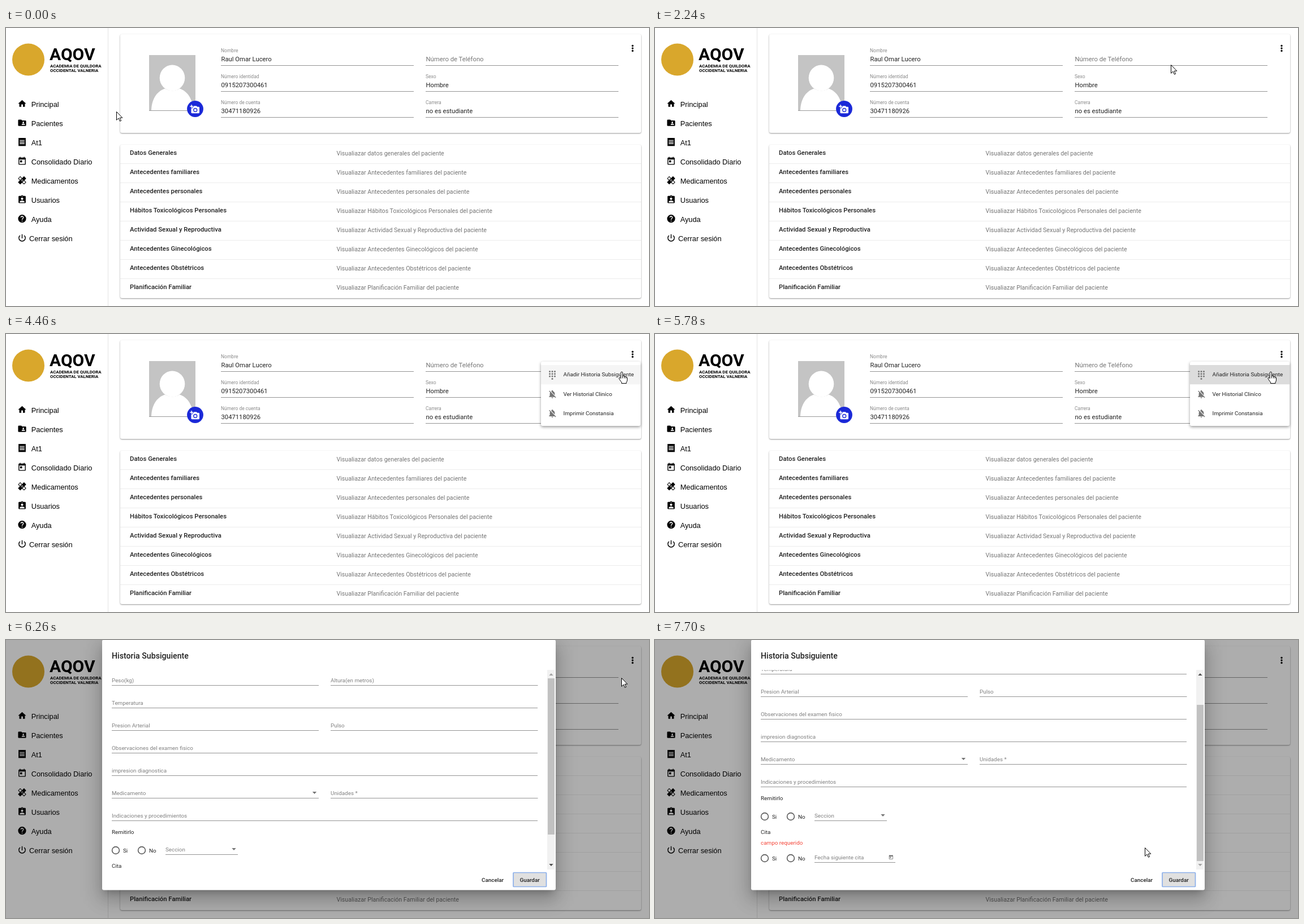
Animation, 1137 px wide and 493 px high, one loop 8000 ms. Source, as an HTML page:

```html
<!DOCTYPE html>
<html lang="es">
<head>
<meta charset="utf-8">
<style>
html, body { margin: 0; width: 100%; height: 100%; overflow: hidden; background: #fff; }
svg { display: block; width: 1137px; height: 493px; font-family: Roboto, sans-serif; }
.side { font: 12.75px "Liberation Sans", Arial, sans-serif; }
.brand { font-weight: 700; }
.tag { font-size: 8.5px; fill: #8a8a8a; }
.val { font-size: 11.25px; fill: #212121; }
.hint { font-size: 11.3px; fill: #757575; }
.dim { font-size: 10.65px; fill: #757575; }
.head { font-size: 11.3px; font-weight: 500; fill: #212121; }
.item { font-size: 9.9px; fill: #212121; }
.form { font-size: 9.85px; fill: #808080; }
.ink { font-size: 9.85px; fill: #212121; }
.err { font-size: 9.85px; fill: #f44336; }
.btn { font-size: 9.85px; font-weight: 500; fill: #212121; }
.title { font-size: 14.15px; font-weight: 500; fill: #212121; }
.card { fill: #fff; filter: drop-shadow(0 1px 1px rgba(0,0,0,.42)); }
.panel { fill: #fff; filter: drop-shadow(0 2px 2.5px rgba(0,0,0,.4)); }
</style>
</head>
<body>
<svg id="stage" viewBox="0 0 1137 493">
  <defs>
    <clipPath id="rowClip"><rect x="946" y="55" width="176" height="34.3"/></clipPath>
    <clipPath id="formClip"><rect x="170" y="53" width="802" height="354"/></clipPath>
  </defs>
  <g id="page"></g>
  <circle id="halo" cx="1108" cy="36" r="14" fill="#000"/>
  <g id="dots"></g>
  <g id="menu"></g>
  <rect id="shade" width="1137" height="493"/>
  <g id="dialog"></g>
  <g id="pointer" fill="#fff" stroke="#000" stroke-linejoin="round">
    <path id="arrow" d="M.5.5v14.8l3.5-3.3 2.4 5.3 2.2-1-2.4-5.1h4.6z"/>
    <path id="hand" d="M-.8 1.8a1.6 1.6 0 0 1 3.2 0V8l1-.6q1.8-.5 2.2 1 2-.8 2.6.8 2.2-.4 2.3 1.6v4q0 2-1.5 4v1.8H.6v-1.9q-1.6-1.6-4.4-6.4-.6-1.6.8-2.1 1.3-.2 2.2 1.6zM2.4 8v3.5M5.6 8.5v3M8.2 9.2v2.5"/>
  </g>
</svg>
<script>
const $ = id => document.getElementById(id);
const text = (cls, x, y, s) => `<text class="${cls}" x="${x}" y="${y}">${s}</text>`;
const rect = (x, y, w, h, attrs = '') => `<rect x="${x}" y="${y}" width="${w}" height="${h}" ${attrs}/>`;
const circle = (x, y, r, attrs = '') => `<circle cx="${x}" cy="${y}" r="${r}" ${attrs}/>`;
const rule = (x1, x2, y, color = '#949494') => rect(x1, y - .5, x2 - x1, 1, `fill="${color}"`);
const icon = (name, cx, cy, size, color = '#000') =>
  `<path transform="translate(${cx - size / 2} ${cy - size / 2}) scale(${size / 24})" fill="${color}" fill-rule="evenodd" d="${icons[name]}"/>`;
const arrow = (x, y, dir, color, id = '') =>
  `<path ${id && `id="${id}"`} fill="${color}" d="M${x - 3.7} ${y - 1.9 * dir}h7.4l-3.7 ${3.8 * dir}z"/>`;
const shadow = (x, y, w, h, drop, blur, spread, alpha) =>
  rect(x - spread, y - spread + drop, w + 2 * spread, h + 2 * spread,
    `rx="3" fill-opacity="${alpha}" style="filter:blur(${blur / 2}px)"`);

const icons = {
  home: 'M10 20v-6h4v6h5v-8h3L12 3 2 12h3v8z',
  folder: 'M20 6h-8l-2-2H4q-2 0-2 2v12q0 2 2 2h16q2 0 2-2V8q0-2-2-2zm-5 3a2 2 0 1 1 0 4 2 2 0 0 1 0-4zm4 8h-8v-1c0-1.3 2.7-2 4-2s4 .7 4 2z',
  list: 'M3 2h18v20H3zM6 7v2h12V7zM6 11v2h12v-2zM6 15v2h12v-2z',
  date: 'M19 3h-1V1h-2v2H8V1H6v2H5q-2 0-2 2v14q0 2 2 2h14q2 0 2-2V5q0-2-2-2zm0 16H5V8h14zM7 10h5v5H7z',
  heal: 'M17.7 12l4-4q.7-.7 0-1.4l-4.3-4.3q-.7-.7-1.4 0l-4 4-4-4q-.7-.7-1.4 0L2.3 6.6q-.7.7 0 1.4l4 4-4 4q-.7.7 0 1.4l4.3 4.3q.7.7 1.4 0l4-4 4 4q.7.7 1.4 0l4.3-4.3q.7-.7 0-1.4zM12 9a1 1 0 1 1 0 2 1 1 0 0 1 0-2zm-4.7 2L3.7 7.3l3.6-3.6 3.6 3.6zM10 13a1 1 0 1 1 0-2 1 1 0 0 1 0 2zm2 2a1 1 0 1 1 0-2 1 1 0 0 1 0 2zm2-4a1 1 0 1 1 0 2 1 1 0 0 1 0-2zm2.7 9.3l-3.6-3.6 3.6-3.6 3.6 3.6z',
  badge: 'M19 3h-4.2a3 3 0 0 0-5.6 0H5q-2 0-2 2v14q0 2 2 2h14q2 0 2-2V5q0-2-2-2zm-7 0a1 1 0 1 1 0 2 1 1 0 0 1 0-2zm0 4a3 3 0 1 1 0 6 3 3 0 0 1 0-6zm6 12H6v-1.4c0-2 4-3.1 6-3.1s6 1.1 6 3.1z',
  help: 'M12 2a10 10 0 1 0 0 20 10 10 0 0 0 0-20zm1 17h-2v-2h2zm2.1-7.8l-.9 1C13.4 12.9 13 13.5 13 15h-2v-.5c0-1.1.4-2.1 1.2-2.8l1.2-1.3A2 2 0 1 0 10 9H8a4 4 0 1 1 7.1 2.2z',
  power: 'M13 3h-2v10h2zM17.8 5.2l-1.4 1.4a7 7 0 1 1-8.8 0L6.2 5.2a9 9 0 1 0 11.6 0z',
  photo: 'M3 4V1h2v3h3v2H5v3H3V6H0V4zM6 10V7h3V4h7l1.8 2H21q2 0 2 2v12q0 2-2 2H5q-2 0-2-2V10zm7 9a5 5 0 1 0 0-10 5 5 0 0 0 0 10zm0-1.8a3.2 3.2 0 1 1 0-6.4 3.2 3.2 0 0 1 0 6.4z',
  muted: 'M20 18.7L5.3 3.5 4 4.8l2.8 2.8Q6 9 6 11v5l-2 2v1h13.7l2 2 1.3-1.3zM12 22q2 0 2-2h-4q0 2 2 2zm6-7.3V11c0-3.1-1.6-5.6-4.5-6.3V4a1.5 1.5 0 0 0-3 0v.7l-1.4.5z'
};

function drawPage() {
  const nav = [['home', 'Principal'], ['folder', 'Pacientes'], ['list', 'At1'], ['date', 'Consolidado Diario'],
    ['heal', 'Medicamentos'], ['badge', 'Usuarios'], ['help', 'Ayuda'], ['power', 'Cerrar sesión']];
  const fields = [[380, 0, 'Nombre', 'Raul Omar Lucero'], [742, 0, '', 'Número de Teléfono'],
    [380, 1, 'Número identidad', '0915207300461'], [742, 1, 'Sexo', 'Hombre'],
    [380, 2, 'Número de cuenta', '30471180926'], [742, 2, 'Carrera', 'no es estudiante']];
  const sections = ['Datos Generales', 'Antecedentes familiares', 'Antecedentes personales',
    'Hábitos Toxicológicos Personales', 'Actividad Sexual y Reproductiva', 'Antecedentes Ginecológicos',
    'Antecedentes Obstétricos', 'Planificación Familiar'];

  let s = rect(0, 0, 1137, 493, 'fill="#fff"') + rect(180, 0, 1, 493, 'fill="#e3e3e3"')
    + circle(39.5, 56, 28.5, 'fill="#d9a72c"')
    + '<g class="brand">'
    + '<text x="77" y="56.5" font-size="30">AQOV</text>'
    + '<text x="78" y="70" font-size="7.8">ACADEMIA DE QUILDORA</text>'
    + '<text x="78" y="78.3" font-size="7.8">OCCIDENTAL VALNERIA</text></g>';
  nav.forEach(([name, label], i) => {
    const y = 135 + 34 * i;
    s += icon(name, 28.5, y - .8, 17) + text('side', name === 'power' ? 41 : 44.7, y + 5, label);
  });

  s += rect(202, 11, 921, 175, 'rx="3" class="card"') + rect(202, 207, 921, 272, 'rx="3" class="card"');
  s += rect(253, 48, 82, 99, 'fill="#c4c4c4"')
    + '<path fill="#fff" d="M257 146C258 122 270 111 281 107.5Q294 115 307 107.5C318 111 330 122 331 146z"/>'
    + '<ellipse cx="294" cy="88.5" rx="22.3" ry="23" fill="#fff"/>'
    + rect(253, 146, 82, 1, 'fill="#9a9a9a"')
    + circle(334.5, 143.5, 14.4, 'fill="#1b29d8"') + icon('photo', 334, 144, 17.5, '#fff');

  for (const [x, row, tag, value] of fields) {
    const y = 46 * row;
    s += text('tag', x, 42.5 + y, tag) + text(tag ? 'val' : 'hint', x + .5, 59.3 + y, value)
      + rule(x, x + 341, 66.5 + y);
  }
  sections.forEach((name, i) => {
    const y = 34.05 * i;
    const topic = i ? name : 'datos generales';
    s += text('head', 219, 225 + y, name) + text('dim', 584.5, 226 + y, `Visualiazar ${topic} del paciente`);
    if (i) s += rule(202, 1123, Math.round(205.5 + y) + .5, '#ececec');
  });
  $('page').innerHTML = s;
  $('dots').innerHTML = [31.5, 36, 40.5].map(y => circle(1108, y, 1.65)).join('');
}

function drawMenu() {
  let s = rect(946, 49, 176, 114, 'rx="3" class="panel"')
    + rect(946, 55, 176, 34.3, 'id="hover" fill-opacity=".04"')
    + `<g clip-path="url(#rowClip)">${circle(1088, 67, 0, 'id="ripple" fill-opacity=".1"')}</g>`;
  for (let i = 0; i < 10; i++)
    s += circle(961.5 + 4.5 * (i < 9 ? i % 3 : 1), 66.5 + 4.3 * Math.floor(i / 3), 1.5, 'fill="#757575"');
  ['Añadir Historia Subsiguiente', 'Ver Historial Cliníco', 'Imprimir Constansia'].forEach((label, i) => {
    if (i) s += icon('muted', 966, 72.5 + 34.2 * i, 17.5, '#757575');
    s += text('item', 985.5, 75.4 + 34.2 * i, label);
  });
  $('menu').innerHTML = s;
}

function drawDialog() {
  const rows = [['Peso(kg)', 'Altura(en metros)'], ['Temperatura'], ['Presion Arterial', 'Pulso'],
    ['Observaciones del examen fisico'], ['impresion diagnostica'], ['Medicamento', 'Unidades *'],
    ['Indicaciones y procedimientos']];
  const radios = y => [['Si', 194], ['No', 240]].map(([label, x]) =>
    circle(x, y, 6.4, 'fill="none" stroke="#5c5c5c" stroke-width="1.6"') + text('ink', x + 13, y + 3.5, label)).join('');

  let form = '';
  rows.forEach(([left, right], i) => {
    const y = 40.05 * i;
    form += text('form', 187, 74.5 + y, left) + rule(187, right ? 553 : 940, Math.round(80 + y) + .5);
    if (right) form += text('form', 574, 74.5 + y, right) + rule(574, 940.5, Math.round(80 + y) + .5);
  });
  form += arrow(545.5, 271, 1, '#757575')
    + text('ink', 187, 343.5, 'Remitirlo') + radios(373)
    + text('form', 282, 374.5, 'Seccion') + rule(282, 410, 380.5) + arrow(403, 371, 1, '#757575')
    + text('ink', 187, 403.5, 'Cita') + text('err', 187, 423.3, 'campo requerido') + radios(447)
    + text('form', 282, 448.7, 'Fecha siguiente cita') + rule(282, 425, 454.5)
    + icon('date', 417.3, 445.3, 9.5, '#6a6a6a');

  const box = [170, -.5, 802, 444];
  $('dialog').innerHTML = shadow(...box, 8, 11, -5, .2) + shadow(...box, 18, 28, 2, .14) + shadow(...box, 7, 34, 6, .12)
    + rect(...box, 'rx="3" fill="#fff"')
    + text('title', 187, 33, 'Historia Subsiguiente')
    + `<g clip-path="url(#formClip)"><g id="form">${form}</g></g>`
    + rect(957, 53, 13.5, 354, 'fill="#f1f1f1"') + rect(958, 68, 12, 277, 'id="thumb" fill="#c1c1c1"')
    + arrow(964, 61, -1, '#a3a3a3', 'up') + arrow(964, 399, 1, '#505050', 'down')
    + rect(897, 412.5, 58.5, 25, 'id="focus" rx="1" fill="#e0e0e0" stroke="#8cb0ea" stroke-width="1.7"')
    + text('btn', 841, 428.5, 'Cancelar') + text('btn', 908.5, 428.5, 'Guardar');
}

const TICK = 60, LOOP = 8000;
const clamp = p => Math.min(1, Math.max(0, p));
const smooth = p => p * p * (3 - 2 * p);
const span = (t, start, length) => clamp((t - start) / length);
const outQuad = p => p * (2 - p);

function bezier(x1, y1, x2, y2) {
  const curve = (a, b, s) => 3 * a * s * (1 - s) ** 2 + 3 * b * s * s * (1 - s) + s ** 3;
  return p => {
    let lo = 0, hi = 1;
    for (let i = 0; i < 24; i++) {
      const mid = (lo + hi) / 2;
      curve(x1, x2, mid) < p ? lo = mid : hi = mid;
    }
    return curve(y1, y2, hi);
  };
}
const popEase = bezier(0, 0, .2, 1);
const fadeEase = bezier(.25, .8, .25, 1);

// start, ticks, x, y
const moves = [[500, 10, 580, 86], [1460, 9, 909, 65], [2240, 13, 1112, 44], [3800, 12, 1088, 67], [6440, 8, 866, 368]];
const CLICK = 5798;

function pointerAt(t) {
  let x = 195, y = 148;
  for (const [start, ticks, toX, toY] of moves) {
    const p = smooth(span(t, start - TICK, ticks * TICK));
    x += (toX - x) * p;
    y += (toY - y) * p;
  }
  return [x, y];
}

const show = (id, on) => { $(id).style.display = on ? '' : 'none'; };
const set = (id, name, value) => $(id).setAttribute(name, value);
const zoom = (x, y, k) => `translate(${x} ${y}) scale(${k}) translate(${-x} ${-y})`;

function render(now) {
  // The screen refreshes on a fixed tick.
  const t = 500 + TICK * Math.floor((now % LOOP - 500) / TICK);

  const [x, y] = pointerAt(t);
  const onRow = t >= 3800 && t < CLICK && y > 55;
  set('pointer', 'transform', `translate(${Math.round(x)} ${Math.round(y)})`);
  show('arrow', !onRow);
  show('hand', onRow);

  const press = span(t, 3320, 180);
  set('halo', 'r', 14 * outQuad(press));
  set('halo', 'opacity', .085 * (1 - span(t, 3740, 660)));

  const open = span(t, 3410, 120);
  set('menu', 'transform', zoom(1122, 49, .8 + .2 * popEase(open)));
  set('menu', 'opacity', open * (1 - span(t, CLICK + 25, 100)));
  show('hover', onRow);
  set('ripple', 'r', 150 * outQuad(span(t, 5300, 480)));

  const pop = popEase(span(t, CLICK, 150));
  set('shade', 'opacity', .32 * fadeEase(span(t, CLICK + 12, 400)));
  show('dialog', t > CLICK);
  set('dialog', 'opacity', pop);
  set('dialog', 'transform', zoom(571, 222, .7 + .3 * pop));
  show('focus', t >= 6020);

  const scroll = smooth(span(t, 7220, 480));
  set('form', 'transform', `translate(0 ${-60 * scroll})`);
  set('thumb', 'y', 68 + 47 * scroll);
  set('up', 'fill', scroll > 0 ? '#505050' : '#a3a3a3');
  set('down', 'fill', scroll < 1 ? '#505050' : '#a3a3a3');
}

drawPage();
drawMenu();
drawDialog();
const begin = performance.now();
function frame() {
  render(performance.now() - begin);
  requestAnimationFrame(frame);
}
frame();
</script>
</body>
</html>
```
